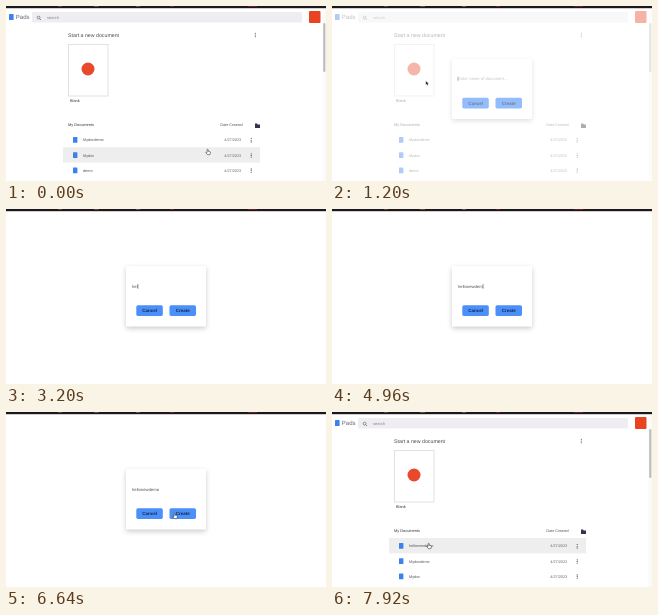
An HTML page for the animation above (8 s loop, 320x175 px).

```html
<!DOCTYPE html>
<html lang="en">
<head>
<meta charset="utf-8">
<title>New document dialog</title>
<style>
html, body { margin: 0; width: 100%; height: 100%; overflow: hidden; background: #fff; }
svg { display: block; width: 100vw; height: 100vh; }
text { font-family: "Liberation Sans", Arial, sans-serif; text-rendering: geometricPrecision; white-space: pre; }
.bold { font-weight: 700; }
#modal { filter: drop-shadow(0 2px 2.5px rgba(0, 0, 0, .2)); }
</style>
</head>
<body>
<svg viewBox="0 0 320 175">
  <defs>
    <g id="dots" fill="#444"><circle r=".55" cy="-1.7"/><circle r=".55"/><circle r=".55" cy="1.7"/></g>
  </defs>
  <rect width="320" height="175" fill="#fff"/>

  <g id="page">
    <rect x="3" y="8" width="4.6" height="6" rx=".6" fill="#3b82ee"/>
    <text x="9.8" y="13.2" font-size="6" fill="#626773">Pads</text>
    <rect x="26" y="6" width="270" height="10.5" rx="1.5" fill="#efedf1"/>
    <g fill="none" stroke="#666" stroke-width=".7"><circle cx="32.6" cy="11.6" r="1.4"/><path d="M33.6 12.6l1.4 1.4"/></g>
    <text x="41" y="12.6" font-size="4" fill="#85858c">search</text>
    <rect x="303" y="5" width="11.5" height="12" rx="1" fill="#ea4322"/>
    <rect x="316.6" y="3" width="3.4" height="172" fill="#fafafa"/>
    <rect x="317.2" y="17" width="2.2" height="49" rx="1.1" fill="#bdbdbd"/>

    <text x="62" y="30.7" font-size="5.25" fill="#4c4c52">Start a new document</text>
    <use href="#dots" x="249.3" y="29"/>
    <rect x="62.5" y="38.5" width="39.5" height="51.5" fill="#fff" stroke="#dcdadd" stroke-width=".8"/>
    <circle cx="82" cy="63" r="6.5" fill="#e8492c"/>
    <text x="64" y="96.3" font-size="3.9" fill="#333">Blank</text>

    <text x="62" y="120.2" font-size="3.9" fill="#333">My Documents</text>
    <text x="214.3" y="120.2" font-size="3.75" fill="#555">Date Created</text>
    <path d="M249 117.6h2l.7.8h2.3v3.6h-5z" fill="#33334a"/>
    <rect id="hover" x="57" width="197" height="15.4" fill="#eeeeef"/>
    <g id="rows"></g>
  </g>

  <g id="modal">
    <rect x="120" y="57" width="80" height="60.5" rx="1" fill="#fff"/>
    <text id="entry" x="126" y="78.7" font-size="4.2"></text>
    <rect id="caret" y="75" width=".5" height="4.8" fill="#333"/>
    <g id="buttons"></g>
  </g>

  <g id="bar">
    <rect width="320" height="2.2" fill="#1b171c"/>
    <g opacity=".55">
      <rect x="52" width="4" height=".8" fill="#a8744c"/><rect x="88" width="5" height=".8" fill="#ae8c50"/>
      <rect x="130" width="4" height=".8" fill="#999"/><rect x="164" width="4" height=".8" fill="#b33"/>
      <rect x="242" width="9" height=".8" fill="#c22b38"/>
    </g>
  </g>

  <g id="cursor">
    <path id="hand" d="M-.9 -2.4q.7-.7 1.1 0v1.6l1.7.4q.7.3.5 1.1l-.6 2h-2.3l-1.7-2q.1-.8 1.3-.3z" fill="#fff" stroke="#333" stroke-width=".6"/>
    <path id="arrow" d="M-1.2 -2v4l1-.9.7 1.5.8-.4-.7-1.4h1.3z" fill="#15151f" stroke="#fff" stroke-width=".25"/>
  </g>
</svg>
<script>
const LOOP = 8000, STEP = 80, ROW_TOP = 126, ROW_H = 15.2;
const $ = id => document.getElementById(id);
const clamp = x => Math.min(1, Math.max(0, x));

const NAME = "hellonewdemo";
const KEYS = [2560, 2800, 3040, 3440, 3760, 4080, 4320, 4400, 4560, 4720, 4960, 5120];
const FILES = ["Mydocdemo", "Mydoc", "demo"];

// Pointer stops: time, x, y
const PATH = [
  [0, 202, 146], [80, 202, 146], [800, 95, 77], [1280, 95, 77], [1760, 150, 77],
  [5600, 198, 74], [5920, 163, 101], [6400, 169, 104], [7040, 169, 104],
  [7600, 118, 129], [7920, 97, 134], [8000, 97, 134]
];

function pointer(t) {
  const i = Math.max(1, PATH.findIndex(p => p[0] >= t));
  const [t0, x0, y0] = PATH[i - 1], [t1, x1, y1] = PATH[i];
  const u = clamp((t - t0) / (t1 - t0)), k = u * u * (3 - 2 * u);
  return [x0 + (x1 - x0) * k, y0 + (y1 - y0) * k];
}

// 0 = page only, 1 = dialog fully open
function dialog(t) {
  const left = (start) => (1 - clamp((t - start) / 880)) ** 2;
  return t < 4000 ? 1 - left(880) : left(6720);
}

const rowMarkup = (name, i) => {
  const y = ROW_TOP + 8 + i * ROW_H;
  return `<rect x="67" y="${y - 3}" width="4.4" height="5.8" rx=".5" fill="#3b82ee"/>
    <text x="77" y="${y + 1.4}" font-size="3.8" fill="#555">${name}</text>
    <text x="218.3" y="${y + 1.4}" font-size="3.8" fill="#666">4/27/2023</text>
    <use href="#dots" x="245.2" y="${y + .2}"/>`;
};
const list = names => names.map(rowMarkup).join("");
const before = list(FILES), after = list([NAME, ...FILES.slice(0, 2)]);

$("buttons").innerHTML = [["Cancel", 130.3], ["Create", 163.5]].map(([label, x]) =>
  `<rect x="${x}" y="96.3" width="26.5" height="10.6" rx="1.6" fill="#4b8ff8"/>
   <text class="bold" x="${x + 13.25}" y="103.2" font-size="4.5" text-anchor="middle" fill="#14284c">${label}</text>`).join("");

let shownList, shownEntry;

function drawEntry(t) {
  const count = KEYS.filter(k => k <= t).length;
  const entry = $("entry");
  if (shownEntry !== count) {
    entry.textContent = count ? NAME.slice(0, count) : "Enter name of document...";
    entry.setAttribute("fill", count ? "#555" : "#a0a0a6");
    shownEntry = count;
  }
  $("caret").setAttribute("x", 126 + (count ? entry.getComputedTextLength() + .1 : -.3));
  $("caret").style.display = t < 5280 ? "" : "none";
}

function draw(time) {
  const t = Math.floor((time % LOOP) / STEP) * STEP;
  const open = dialog(t), [x, y] = pointer(t);

  const rows = t < 4000 ? before : after;
  if (rows !== shownList) $("rows").innerHTML = shownList = rows;
  $("page").setAttribute("opacity", 1 - open);

  const row = Math.floor((y - ROW_TOP) / ROW_H);
  $("hover").style.display = row >= 0 && x > 57 && x < 254 ? "" : "none";
  $("hover").setAttribute("y", ROW_TOP + Math.max(0, row) * ROW_H);

  $("modal").style.display = open > 0 ? "" : "none";
  $("modal").setAttribute("opacity", open);
  $("modal").setAttribute("transform", `translate(0 ${-11 * (1 - open)})`);
  drawEntry(t);

  const isArrow = t >= 1040 && t < 6240;
  $("cursor").style.display = t >= 1760 && t < 5600 ? "none" : "";
  $("cursor").setAttribute("transform", `translate(${x} ${y})`);
  $("arrow").style.display = isArrow ? "" : "none";
  $("hand").style.display = isArrow ? "none" : "";
}

const start = performance.now();
function tick() {
  draw(performance.now() - start);
  requestAnimationFrame(tick);
}
tick();
</script>
</body>
</html>
```
